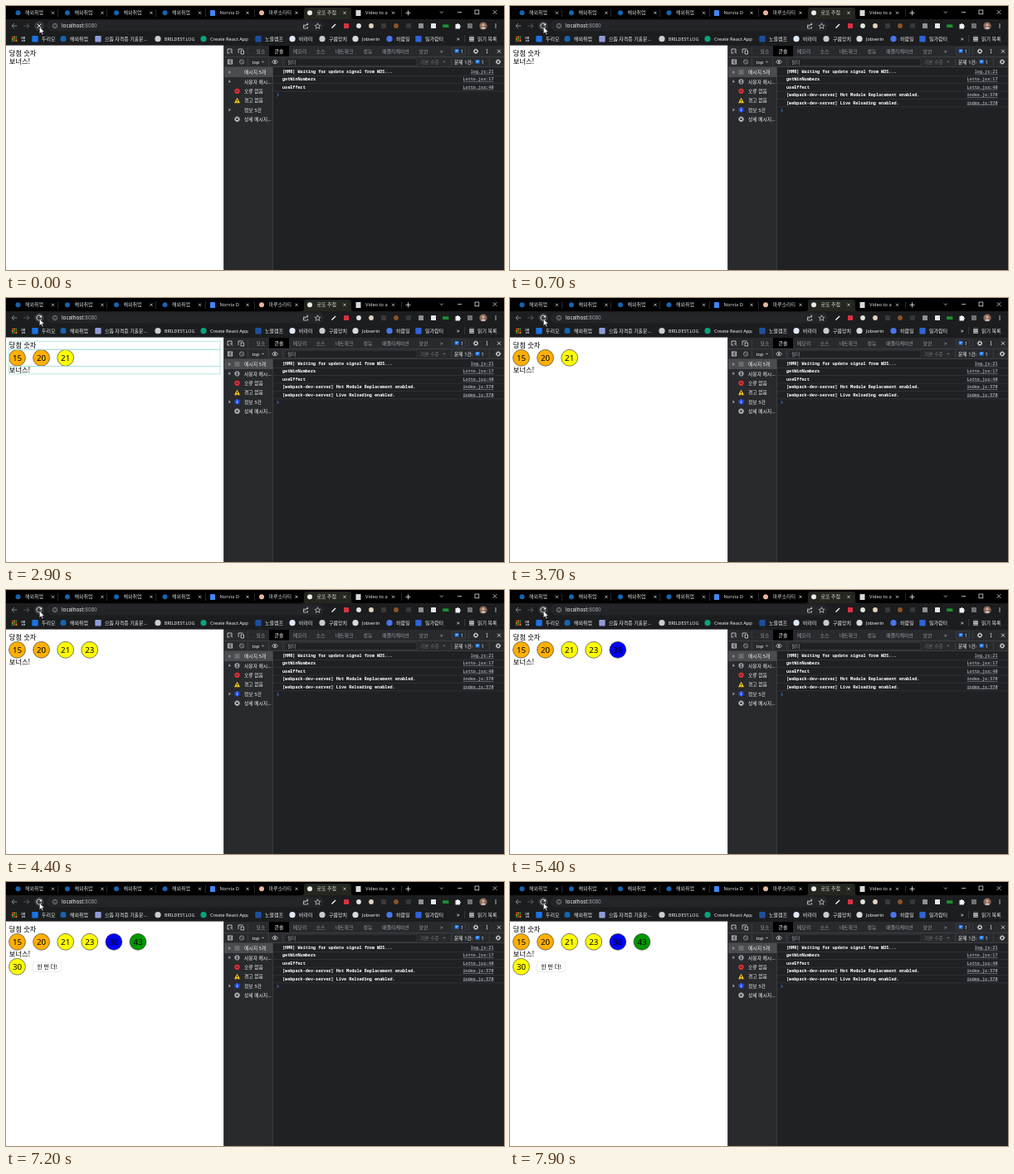
These frames come from a looping animation (600 by 319 pixels, 8000 ms). An HTML page:

```html
<!DOCTYPE html>
<html lang="ko">
<head>
<meta charset="utf-8">
<style>
html, body { margin: 0; width: 100%; height: 100%; overflow: hidden; background: #202124; }
svg { display: block; }
text { font-family: "Noto Sans", "Noto Sans CJK KR", "Noto Sans CJK", sans-serif; white-space: pre; }
.mono { font-family: "Noto Sans Mono", "Liberation Mono", monospace; font-weight: 600; }
#page text { font-weight: 300; }
</style>
</head>
<body>
<svg id="stage" width="600" height="319" viewBox="0 0 600 319"></svg>
<script>
const LIGHT = '#f1f3f4', GREY = '#9aa0a6', LINE = '#494c50', BLUE = '#1a73e8', BAR = '#1c1d1f';

const text = (x, y, s, size = 6, fill = LIGHT, more = '') =>
  `<text x="${x}" y="${y}" font-size="${size}" fill="${fill}" ${more}>${s}</text>`;
const mid = (x, y, s, size, fill) => text(x, y, s, size, fill, 'text-anchor="middle"');
const rect = (x, y, w, h, fill, more = '') =>
  `<rect x="${x}" y="${y}" width="${w}" height="${h}" fill="${fill}" ${more}/>`;
const dot = (x, y, r, fill, more = '') =>
  `<circle cx="${x}" cy="${y}" r="${r}" fill="${fill}" ${more}/>`;
const path = (d, stroke = LIGHT, w = 0.8, fill = 'none') =>
  `<path d="${d}" stroke="${stroke}" stroke-width="${w}" fill="${fill}"/>`;
const cross = (x, y, r, color, w) =>
  path(`M${x - r} ${y - r}l${2 * r} ${2 * r}m0 ${-2 * r}l${-2 * r} ${2 * r}`, color, w);
const ring = (x, y, r, color = LIGHT, w = 0.8) => dot(x, y, r, 'none', `stroke="${color}" stroke-width="${w}"`);
const kebab = (x, y) => [-2, 0, 2].map(d => dot(x, y + d, 0.65, LIGHT)).join('');
const gear = (x, y) => ring(x, y, 1.9, LIGHT, 1) +
  dot(x, y, 2.7, 'none', `stroke="${LIGHT}" stroke-width="1" stroke-dasharray="1 1.12"`);
const down = (x, y, color = GREY) => path(`M${x - 1.5} ${y - 1}h3l-1.5 2z`, 'none', 0, color);
const right = (x, y) => path(`M${x - 1.2} ${y - 2}v4l2.5 -2z`, 'none', 0, GREY);
const vline = (x, y, h, color = LINE) => rect(x, y, 0.6, h, color);
const hline = (x, y, w, color = LINE) => rect(x, y, w, 0.6, color);
const list = (x, y, color = LIGHT) => path(`M${x - 3} ${y - 2}h6m-6 2h6m-6 2h6`, color, 0.8);
const group = (id, body) => `<g id="${id}">${body}</g>`;
const each = (rows, draw) => rows.map(r => draw(...r)).join('');

function tabs() {
  const items = [
    [14.5, '해외취업', '#1464b0'], [74, '해외취업', '#1464b0'], [133, '해외취업', '#1464b0'],
    [191.5, '해외취업', '#1464b0'], [249, 'Norvia D', '#4285f4', 1], [308, '마루소라티', '#e8b49a'],
    [366, '로또 추첨', '#e8eaed'], [424.5, 'Video to a', '#d8d8d8', 1],
  ];
  return rect(0, 0, 600, 48, '#000') +
    path('M356 16q3 0 3 -3v-8q0 -3 3 -3h51q3 0 3 3v8q0 3 3 3z', 'none', 0, '#25261f') +
    each(items, (x, s, color, square) =>
      (square ? rect(x - 3, 5, 6, 7, color, 'rx=".6"') : dot(x, 8.3, 3, color)) +
      text(x + 8.5, 10.4, s, square ? 5.7 : 6, '#dcdee1') +
      cross(x + 42, 8.3, 1.6, LIGHT, 0.7)) +
    [62, 121, 180, 240, 299, 476].map(x => vline(x, 4, 9, '#444')).join('') +
    path('M481.5 8.3h6m-3 -3v6', LIGHT) +
    path('M522.8 6.5l2 2l2 -2M544 7.5h5', LIGHT, 0.7) +
    rect(565, 5, 4.8, 4.8, 'none', `stroke="${LIGHT}" stroke-width=".7"`) +
    cross(589, 7.5, 2.4, LIGHT, 0.7);
}

function toolbar() {
  const icons = [
    [410, '#d93041', 1], [425, '#e4e4e4'], [440, '#e8d2ba'], [455, '#3a3a3a', 1], [470, '#8a5526'],
    [485, '#33363c', 1], [500, '#8e9196', 1], [515, '#e6e6e6', 1],
  ];
  return rect(0, 16, 600, 32, BAR) +
    dot(40, 24, 5.8, '#35363a', 'id="hover"') +
    path('M13.5 24h-6.5m3 -3l-3 3l3 3', GREY) +
    path('M21.5 24h6.5m-3 -3l3 3l-3 3', '#66696e') +
    rect(49, 17.5, 334, 13, '#242528', 'rx="6.5"') +
    ring(59, 24, 2.7, GREY, 0.7) + path('M59 23.5v2M59 22v.8', GREY, 0.7) +
    text(67, 26.3, `localhost<tspan fill="${GREY}">:8080</tspan>`, 6.3) +
    path('M360 23h-1.5v4h5v-2m-3.5 0q0 -3 4 -3m-1.5 -1.6l1.6 1.6l-1.6 1.6', LIGHT, 0.7) +
    path('M375.5 20.8l1 2.3l2.4 .2l-1.8 1.6l.6 2.4l-2.2 -1.3l-2.2 1.3l.6 -2.4l-1.8 -1.6l2.4 -.2z', LIGHT, 0.6) +
    path('M392.5 26.5l4.5 -4.5', LIGHT, 1.5) +
    each(icons, (x, color, square) =>
      square ? rect(x - 3, 21, 6, 6, color, 'rx=".6"') : dot(x, 24, 2.9, color)) +
    rect(526, 22.3, 7.5, 3.6, '#17912f', 'rx=".6"') +
    path('M541.5 22h1.7a1 1 0 0 1 2 0h1.7v1.7a1 1 0 0 1 0 2v1.8h-5.4z', 'none', 0, LIGHT) +
    list(559, 24) +
    dot(575, 24, 4.6, '#8c6a5c') + dot(575, 22.9, 1.6, '#d7b09b') + path('M572 27.5q3 -4 6 0z', 'none', 0, '#d9d5d2') +
    kebab(590, 24);
}

function bookmarks() {
  const items = [
    [35, '두리모', '#1a73e8', 1], [69, '해외취업', '#1464b0'], [111, '으뜸 자격증 기출문...', '#8f9bd8', 1, 5.9],
    [183, 'BRILDEST.LOG', '#c9ccd2', 0, 5.4], [238, 'Create React App', '#09a37c', 0, 5.7],
    [304, '노을캠프', '#1d4fa0', 1], [345, '바라미', '#dfe8f6'], [381, '구름망치', '#c8cbd0'],
    [421, 'Jobverin', '#d8dade', 0, 5.6], [462, '하람일', '#4876ef'], [497, '일가람터', '#2f62d9', 1],
  ];
  const colors = ['#ea4335', '#fbbc04', '#34a853'];
  let apps = '';
  for (let i = 0; i < 9; i++)
    apps += rect(7 + i % 3 * 2.3, 36.7 + (i / 3 | 0) * 2.3, 1.6, 1.6, colors[(i + (i / 3 | 0)) % 3]);
  return apps + text(18, 42, '앱') +
    each(items, (x, s, color, square, size = 6) =>
      (square ? rect(x - 3.7, 36, 7.4, 7.4, color, 'rx="1"') : dot(x, 39.7, 3.6, color)) +
      text(x + 8, 42, s, size)) +
    text(543, 42, '»', 7) + vline(552.5, 35, 9) +
    rect(558, 36.7, 6, 6, LIGHT, 'rx=".6"') + list(561, 39.7, BAR) +
    text(568, 42, '읽기 목록');
}

function page() {
  const balls = [[15, '#ffb000'], [20, '#ffb000'], [21, '#ff0'], [23, '#ff0'], [38, '#00f'], [43, '#009800']];
  const ball = (x, y, n, color) =>
    dot(x, y, 9.9, color, 'stroke="#222" stroke-width=".6"') + mid(x, y + 3.8, n, 9.8, '#000');
  const frame = (x, y, w, h) => rect(x, y, w, h, 'none', 'stroke="#a5dfdc" stroke-width=".8"');
  return rect(0, 47.6, 262.4, 271.4, '#fff') +
    text(3.8, 60, '당첨 숫자', 8.3, '#000') + group('bonus', text(3.8, 90, '보너스!', 8.3, '#000')) +
    balls.map(([n, c], i) => group('ball' + i, ball(13.5 + 29.1 * i, 72.3, n, c))).join('') +
    group('ball6', ball(13.5, 102.3, 30, '#ff0') +
      rect(32, 97, 35, 11.5, '#fff', 'stroke="#ddd" stroke-width=".6" rx="1"') +
      mid(49.5, 105.2, '한 번 더!', 6.8, '#000')) +
    group('flash', frame(3.6, 52.2, 254.4, 10) + frame(3.6, 62.2, 254.4, 20.3) + frame(3.6, 82.5, 254.4, 9.3)) +
    group('flashEnd', frame(3.6, 92.2, 20, 20.3) + frame(32, 97, 35, 11.5));
}

function devtools() {
  const panels = [[307, '요소'], [354, '메모리'], [379, '소스'], [407.5, '네트워크'], [436, '성능'],
    [469.5, '애플리케이션'], [503, '보안']];
  const side = ['메시지 5개', '사용자 메시...', '오류 없음', '경고 없음', '정보 5건', '상세 메시지...'];
  const badge = x => rect(x, 52, 5.2, 4.6, BLUE, 'rx=".7"') + path(`M${x + 1.2} 53.5h3m-3 1.5h2`, '#fff', 0.5);
  return rect(262.4, 48, 337.6, 271, '#202124') + rect(262.4, 48, 337.6, 25.6, '#292a2d') +
    rect(262.4, 73.6, 59, 245.4, '#292a2d') +
    rect(317, 48, 24, 13, '#000') + hline(262.4, 61, 338) + hline(262.4, 73.2, 338) + vline(262.4, 48, 271) +
    path('M272 56v-4h-5v5h2.5m.5 -2.5l3 3', LIGHT, 0.7) +
    path('M280 57v-5h5.5m-2.5 2h3.5v4h-3.5z', LIGHT, 0.7) + vline(291, 50, 9) +
    each(panels, (x, s) => mid(x, 57.1, s, 5.9, GREY)) + mid(329, 57.1, '콘솔', 5.9, '#fff') +
    text(523, 57, '»', 7, GREY) +
    rect(537.5, 50, 16, 9, 'none', `rx="1" stroke="${LINE}" stroke-width=".6"`) + badge(540.5) +
    text(548, 57, '1', 5.6) + vline(557, 50, 9) + gear(566, 54.7) + kebab(579.5, 54.7) + cross(594, 54.7, 2, LIGHT, 0.8) +
    rect(267.3, 65, 5.4, 5, 'none', `stroke="${LIGHT}" stroke-width=".7"`) + path('M269 65v5m3 -3.7l-1.6 1.2l1.6 1.2', LIGHT, 0.7) +
    ring(284, 67.5, 2.6, GREY) + path('M282.2 65.7l3.6 3.6', GREY) + vline(291, 63, 9) +
    text(296.5, 69.5, 'top', 5.6) + down(309.5, 67.7) + vline(316, 63, 9) +
    path('M320.5 67.5q3.5 -4.5 7 0q-3.5 4.5 -7 0z', LIGHT, 0.7) + dot(324, 67.5, 1.1, LIGHT) + vline(333, 63, 9) +
    rect(336, 63.3, 159, 8.8, '#202124', `stroke="${LINE}" stroke-width=".4"`) + text(339, 69.7, '필터', 5.8, GREY) +
    text(499, 69.7, '기본 수준', 5.8, '#6f7378') + down(528, 67.7, '#6f7378') + vline(536, 63, 9) +
    text(540, 69.7, '문제 1건:', 5.8) + `<g transform="translate(0 13)">${badge(565.5)}</g>` + text(572.5, 69.7, '1', 5.6) +
    vline(582, 63, 9) + gear(593, 67.5) +
    rect(263, 74, 58.4, 12, '#4b4c4f') + vline(321.4, 73.6, 246) +
    side.map((s, i) => text(287, 82.2 + 11.35 * i, s, 5.8)).join('') +
    [0, 1, 4].map(i => right(269.5, 80 + 11.35 * i)).join('') +
    dot(278.5, 102.8, 3.1, '#e8303a') + cross(278.5, 102.8, 1.2, '#202124', 0.8) +
    path('M278.5 110.8l3.5 6.4h-7z', 'none', 0, '#f5c518') + path('M278.5 113v2.2m0 .6v.8', '#202124', 0.8) +
    gear(278.5, 136.8) + ring(278.5, 136.8, 3, GREY, 0.6);
}

const chevron = y => path(`M326.5 ${y - 1.8}l2 1.8l-2 1.8`, '#3b8cf0', 0.9);
function log(i, s, link) {
  const y = 80.9 + 9.4 * i;
  return text(333, y, s, 5.15, '#fff', 'class="mono"') +
    text(587.5, y, link, 5.15, GREY, 'class="mono" text-anchor="end" text-decoration="underline"') +
    hline(322, y + 3.1, 278, '#3a3b3e');
}

const loading = cross(40, 24, 2.4, LIGHT, 0.9) + chevron(107.3);
const ready =
  path('M42.4 22.2a3 3 0 1 0 .4 2.6', LIGHT, 0.9) + path('M43.2 20.5v3h-3z', 'none', 0, LIGHT) +
  list(278.5, 80, GREY) +
  dot(278.5, 91.4, 3.1, GREY) + dot(278.5, 90.4, 1, '#202124') + path('M276.6 93.3q1.9 -2.4 3.8 0z', 'none', 0, '#202124') +
  dot(278.5, 125.4, 3.1, '#2b50e0') + path('M278.5 125v2m0 -3.5v.7', '#fff', 0.8) +
  log(3, '[webpack-dev-server] Hot Module Replacement enabled.', 'index.js:570') +
  log(4, '[webpack-dev-server] Live Reloading enabled.', 'index.js:570') +
  chevron(126.2);

document.getElementById('stage').innerHTML =
  tabs() + toolbar() + bookmarks() + group('page', page()) + devtools() +
  log(0, '[HMR] Waiting for update signal from WDS...', 'log.js:21') +
  log(1, 'getWinNumbers', 'Lotto.jsx:17') + log(2, 'useEffect', 'Lotto.jsx:40') +
  group('loading', loading) + group('ready', ready) +
  path('M40.3 25v8.6l2 -1.8l1.4 3l1.3 -.6l-1.4 -2.9h2.6z', '#000', 0.5, '#fff');

const byId = id => document.getElementById(id);
const show = (id, on) => byId(id).style.display = on ? '' : 'none';

// A ball lands every second; the updated rows stay outlined for 300 ms.
function draw(now) {
  const t = now % 8000, since = (t - 900) % 1000;
  show('loading', t < 100);
  show('ready', t >= 100);
  for (let i = 0; i < 7; i++) show('ball' + i, t >= 900 + 1000 * i);
  // The row of balls has no height until the first one lands.
  byId('bonus').setAttribute('transform', `translate(0 ${t < 900 ? -20 : 0})`);
  const flash = t >= 900 && t < 7200 && since < 300;
  show('flash', flash);
  show('flashEnd', flash && t >= 6900);
  requestAnimationFrame(draw);
}
draw(0);
</script>
</body>
</html>
```
